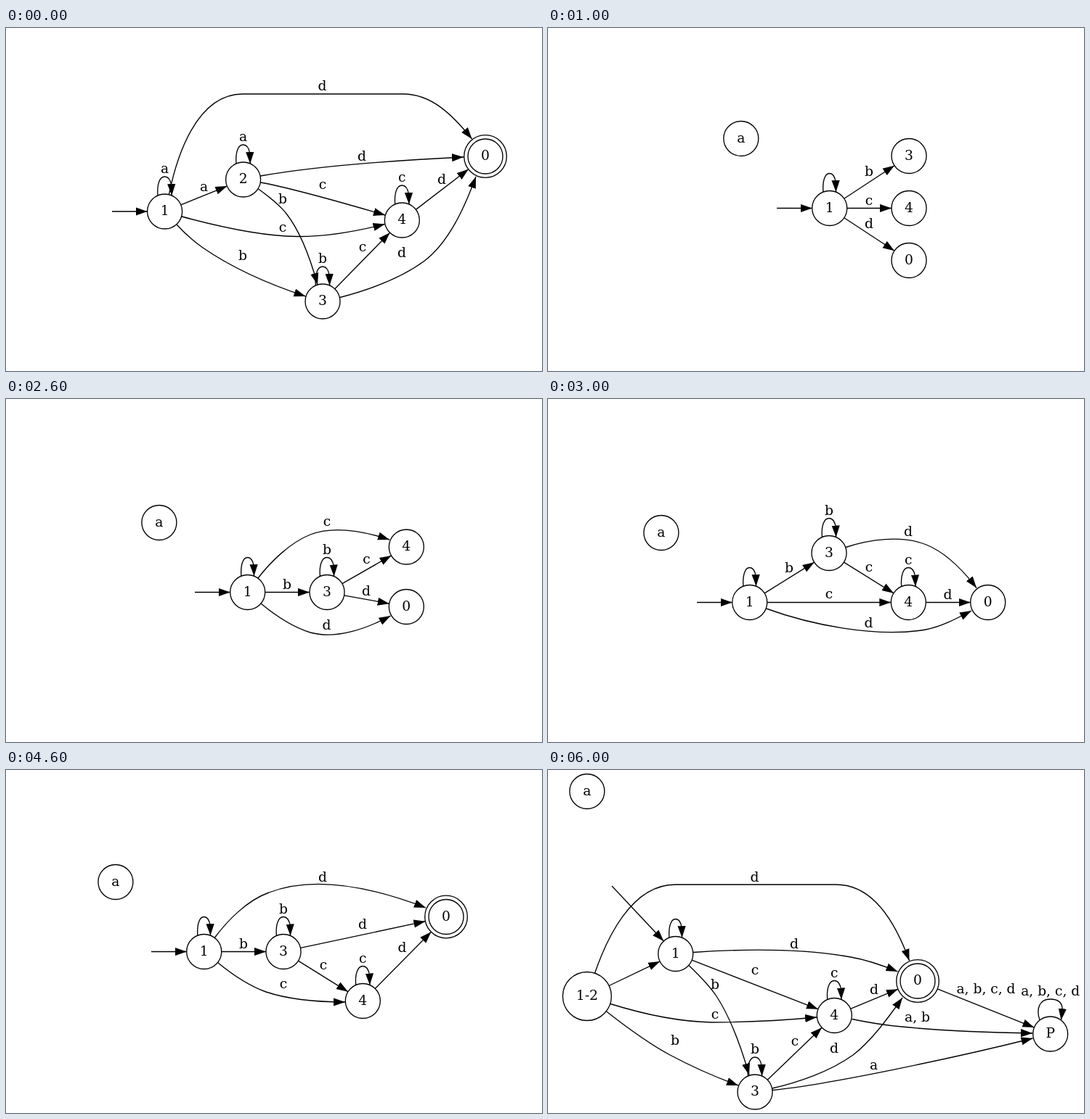
An HTML page that plays this animation: 738x473 px, repeating every 7 s.

```html
<!DOCTYPE html>
<html>
<head>
<meta charset="utf-8">
<style>
html, body { margin: 0; width: 100%; height: 100%; overflow: hidden; background: #fff; }
svg { display: block; }
text { font: 18.667px "DejaVu Serif", serif; text-anchor: middle; }
path, circle { fill: none; stroke: #000; stroke-width: 1.333; }
.edge { marker-end: url(#arrow); }
#arrow path { fill: #000; stroke: none; }
</style>
</head>
<body>
<svg width="738" height="473" viewBox="0 0 738 473">
  <defs>
    <marker id="arrow" markerUnits="userSpaceOnUse" markerWidth="16" markerHeight="12" refX="16" refY="6" orient="auto">
      <path d="M16 6L0 .4V11.6Z"/>
    </marker>
  </defs>
  <g id="graph"></g>
</svg>
<script>
// Edges are [route, label, x, baseline]; a route is "from>to" (straight) or path data.
const scenes = [
  {
    nodes: { 1: [218.6, 253], 2: [326.6, 209], 3: [436, 377], 4: [545.3, 265], 0: [660, 177] },
    start: [146, 253], accept: true, loops: { 1: 'a', 2: 'a', 3: 'b', 4: 'c' },
    edges: [
      ['M224.5 229C235 178 262 91 326 91H547C586 91 615 120 641.5 153', 'd', 435.5, 86],
      ['1>2', 'a', 272.5, 225],
      ['M350.5 204C425 191 525 183 630 178', 'd', 490, 182.5],
      ['M350.5 213C400 222 470 243 522 258', 'c', 436, 222],
      ['M347.5 222C361 232 376 243 386 256C408 284 421 325 429 354', 'b', 381, 241.5],
      ['M242 260C290 273 350 287 400 287.5C440 288 480 281 521.5 270.5', 'c', 381, 281],
      ['M235 271C246 283 258 294 271 303C313 332 367 355 412.5 370', 'b', 326, 320],
      ['3>4', 'c', 491, 307.5],
      ['M460 371.5C496 362 542 346 575 322C610 296 632 246 647 205', 'd', 545, 315.5],
      ['4>0', 'd', 600, 214.5]
    ]
  },
  {
    nodes: { a: [265.8, 152.5], 1: [387.7, 248.5], 3: [497, 176.5], 4: [497, 248.5], 0: [497, 320.5] },
    start: [315, 248.5], loops: { 1: '' },
    edges: [['1>3', 'b', 442, 203.5], ['1>4', 'c', 442, 243.5], ['1>0', 'd', 442, 275.5]]
  },
  {
    nodes: { a: [210.9, 170.5], 1: [332.7, 266.5], 3: [442, 266.5], 4: [551.3, 204], 0: [551.3, 286.5] },
    start: [260, 266.5], loops: { 1: '', 3: 'b' },
    edges: [
      ['1>3', 'b', 387, 261.5],
      ['3>4', 'c', 496.5, 226.5],
      ['3>0', 'd', 496, 271],
      ['M347 247C364 225 391 198 419 187C453 174 495 183 528 194', 'c', 442, 174.5],
      ['M351 282C369 297 393 314 419 322C455 332 498 316 529.5 299', 'd', 441.5, 317.5]
    ]
  },
  {
    nodes: { a: [155.9, 184.5], 1: [277.7, 280.5], 3: [387, 212.5], 4: [496.3, 280.5], 0: [605.7, 280.5] },
    start: [205, 280.5], loops: { 1: '', 3: 'b', 4: 'c' },
    edges: [
      ['1>3', 'b', 332, 238.5],
      ['3>4', 'c', 442, 237.5],
      ['1>4', 'c', 387, 275],
      ['4>0', 'd', 550.5, 275.5],
      ['M410 204.5C441 194 486 187 521 201C548 212 572 237 590 260.5', 'd', 496, 189],
      ['M300.5 289C358 310 449 330 520 318C542 314 564 302 583 292', 'd', 441.5, 314.5]
    ]
  },
  {
    nodes: { a: [150.9, 154.5], 1: [272.7, 250.5], 3: [382, 250.5], 4: [491.3, 318.5], 0: [606, 202.5] },
    start: [200, 250.5], accept: true, loops: { 1: '', 3: 'b', 4: 'c' },
    edges: [
      ['1>3', 'b', 327, 246],
      ['3>0', 'd', 491, 219],
      ['3>4', 'c', 437, 274.5],
      ['4>0', 'd', 545.5, 250.5],
      ['M287.5 231C304 209 331 180 362 169C432 142 521 168 578 190', 'd', 436, 153.5],
      ['M291.5 265.5C309 280 333 297 358 306C391 317 432 320 467 320', 'c', 382, 301]
    ]
  },
  {
    nodes: { a: [150.9, 144.5], '1-2': [150.9, 225.8], 1: [272.7, 355], 3: [382, 204.5], 4: [491.3, 278], 0: [606, 191] },
    start: [200, 355], accept: true, loops: { 1: '', 3: 'b', 4: 'c' },
    edges: [
      ['M177 203.5C190 191 205 179 214 164C231 135 232 88 271 88H493C535 88 567 130 591 164', 'd', 381.5, 83.5],
      ['1-2>3', 'b', 272, 206.5],
      ['1-2>4', 'c', 327.5, 246],
      ['1-2>1'],
      ['3>0', 'd', 491, 190.5],
      ['3>4', 'c', 437, 231.5],
      ['4>0', 'd', 546, 226],
      ['1>4', 'c', 382, 303],
      ['M294 345C308 338 325 328 335 316C354 292 367 257 374.5 228.5', 'b', 327, 310.5],
      ['M297 356C367 360 478 347 541 294C562 276 580 244 592 218', 'd', 436, 338]
    ]
  },
  {
    nodes: { a: [53.8, 29.5], '1-2': [53.8, 312], 1: [175.7, 253.5], 3: [285, 444], 4: [394.3, 338.5], 0: [509, 291], P: [691.7, 364] },
    start: [88, 160], accept: true, loops: { 1: '', 3: 'b', 4: 'c' },
    edges: [
      ['1-2>1'],
      ['M64.5 280C80 235 114 158 175 158H397C448 158 479 212 497.5 263', 'd', 284.5, 153.5],
      ['M199.5 251.5C265 247 350 246 417 258C440 262 462 270 481.5 278', 'd', 339, 246],
      ['1>4', 'c', 285, 281.5],
      ['M194 269.5C207 282 222 297 232 312C253 344 267 386 277 420.5', 'b', 230, 301.5],
      ['M86 322.5C126 335 179 347 226 348C274 348 326 345 370 341', 'c', 230, 343],
      ['M80.5 333C106 353 138 377 168 393C198 409 232 424 262 435', 'b', 175, 378.5],
      ['3>4', 'c', 340, 379.5],
      ['M308.5 439C344 431 388 416 420 393C445 374 469 341 488 314', 'd', 394, 390],
      ['M309 441.5C385 434 560 397 667.5 370', 'a', 448.5, 413],
      ['4>0', 'd', 449, 308.5],
      ['M418.5 343.5C440 348 464 352 487 354C545 360 610 362 667 363', 'a, b', 508.5, 347],
      ['0>P', 'a, b, c, d', 603, 308],
      ['M677 345C672 330 676 316 691.7 316C702 316 708 321 708.3 330L706.5 345', 'a, b, c, d', 691.7, 311]
    ]
  }
];

const text = (s, x, y) => s ? `<text x="${x}" y="${y}">${s}</text>` : '';
const edge = d => `<path class="edge" d="${d}"/>`;
const circle = ([x, y], r) => `<circle cx="${x}" cy="${y}" r="${r}"/>`;

function line([x1, y1], [x2, y2], r1, r2) {
  const length = Math.hypot(x2 - x1, y2 - y1);
  const dx = (x2 - x1) / length, dy = (y2 - y1) / length;
  return edge(`M${x1 + dx * r1} ${y1 + dy * r1}L${x2 - dx * r2} ${y2 - dy * r2}`);
}

function loop([x, y], label) {
  const w = label ? 9.6 : 8.8, h = Math.sqrt(24 * 24 - w * w);
  const at = (u, dy) => `${x + u * w} ${y - dy} `;
  return edge('M' + at(-1, h) + 'C' + at(-1.13, 36) + at(-.8, 48) + at(0, 48) +
    'C' + at(.51, 48) + at(.83, 43) + at(.96, 36) + 'L' + at(1, h)) + text(label, x, y - 53);
}

function render({ nodes, start, accept, loops, edges }) {
  const radius = id => id === '1-2' ? 33.5 : id === '0' && accept ? 29.3 : 24;
  let svg = line(start, nodes[1], 0, 24);
  for (const [id, p] of Object.entries(nodes)) {
    svg += circle(p, radius(id)) + text(id, p[0], p[1] + 5);
    if (id === '0' && accept) svg += circle(p, 24);
  }
  for (const id in loops) svg += loop(nodes[id], loops[id]);
  for (const [route, label, x, y] of edges) {
    const [from, to] = route.split('>');
    svg += to ? line(nodes[from], nodes[to], radius(from), radius(to)) : edge(route);
    svg += text(label, x, y);
  }
  return svg;
}

const graph = document.getElementById('graph');
let shown = -1;
function tick() {
  const index = Math.floor(performance.now() / 1000) % scenes.length;
  if (index !== shown) graph.innerHTML = render(scenes[shown = index]);
  requestAnimationFrame(tick);
}
tick();
</script>
</body>
</html>
```
